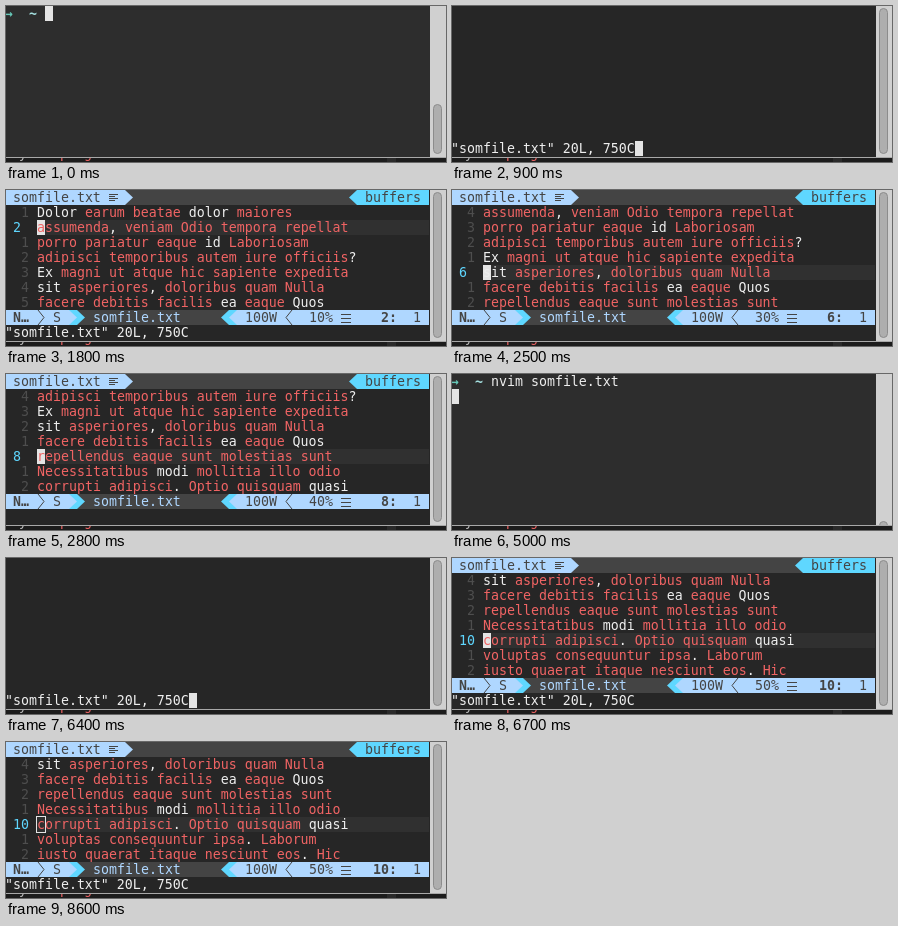
Recreate the animation shown at these times as an HTML page. Size 440 by 156 pixels, loop 8900 ms.

```html
<!DOCTYPE html>
<html lang="en">
<head>
<meta charset="utf-8">
<title>Terminal session</title>
<style>
  html, body { margin: 0; width: 100%; height: 100%; overflow: hidden; background: #1c1c1c; }
  #stage { position: relative; width: 440px; height: 156px; overflow: hidden; background: #1c1c1c;
    font: 13.288px/15px "DejaVu Sans Mono", monospace; color: #eeeeee; }
  #stage div, #stage span.at { position: absolute; white-space: pre; }
  #term { left: 0; top: 0; width: 424px; height: 151px; overflow: hidden; background: #2d2d2d; }
  #term.vim { background: #262626; }
  #bar { left: 424px; top: 0; width: 16px; height: 151px; overflow: hidden; background: #d0d0d0; }
  #thumb { left: 3px; width: 7px; border: 1px solid #8c8c8c; border-radius: 5px; background: #aeaeae; }
  #edge { left: 0; top: 151px; width: 440px; height: 1px; background: #a8a8a8; }
  #below { left: 0; top: 152px; width: 440px; height: 4px; overflow: hidden; color: #b8b8b8; }
  .arrow { color: #66c8b8; font-weight: bold; }
  .home { color: #a4e0e0; font-weight: bold; }
  .bad { color: #f06464; }
  .rel { color: #4e4e4e; }
  .num { color: #5fd7ff; }
  .name { color: #afd7ff; }
  .dark { color: #444444; }
  .bold { color: #444444; font-weight: bold; }
  .right { clip-path: polygon(0 0, 100% 50%, 0 100%); }
  .left { clip-path: polygon(100% 0, 0 50%, 100% 100%); }
  .block { background: #e4e4e4; }
  .hollow { margin: -1px; border: 1px solid #e4e4e4; }
</style>
</head>
<body>
<div id="stage">
  <div id="term"></div>
  <div id="bar"><div id="thumb"></div></div>
  <div id="edge"></div>
  <div id="below">
    <span class="at" style="left:13px;top:-12px">y</span>
    <span class="at bad" style="left:46px;top:-12px"> prog</span>
    <div style="left:381px;top:0;width:9px;height:4px;background:#2a2a2a"></div>
  </div>
</div>
<script>
const LOOP = 8900, CELL = 8, ROW = 15, COLS = 53;
const LIGHT = '#afd7ff', CYAN = '#5fd7ff', GREY = '#444444';
const FILE = 'somfile.txt', INFO = `"${FILE}" 20L, 750C`;
const TEXT = [
  'Dolor earum beatae dolor maiores',
  'assumenda, veniam Odio tempora repellat',
  'porro pariatur eaque id Laboriosam',
  'adipisci temporibus autem iure officiis?',
  'Ex magni ut atque hic sapiente expedita',
  'sit asperiores, doloribus quam Nulla',
  'facere debitis facilis ea eaque Quos',
  'repellendus eaque sunt molestias sunt',
  'Necessitatibus modi mollitia illo odio',
  'corrupti adipisci. Optio quisquam quasi',
  'voluptas consequuntur ipsa. Laborum',
  'iusto quaerat itaque nesciunt eos. Hic'
];
const KNOWN = new Set('Dolor dolor id Ex sit ea Quos modi quasi'.split(' '));
const THUMBS = { start: [98, 50], full: [2, 146], end: [147, 50] };

const term = document.getElementById('term');
const thumb = document.getElementById('thumb');

const x = col => col * CELL - 1;
const put = (col, row, text, cls = '') =>
  `<span class="at ${cls}" style="left:${x(col)}px;top:${row * ROW}px">${text}</span>`;
const box = (col, row, cols, color, cls = '') =>
  `<div class="${cls}" style="left:${x(col)}px;top:${row * ROW}px;width:${cols * CELL}px;` +
  `height:${ROW}px;${color ? 'background:' + color : ''}"></div>`;
const cursor = (col, row, kind = 'block') => box(col, row, 1, '', kind);

// Menu sign made of evenly spaced strokes
const menu = (col, row, gap, widths) => widths.map((w, i) =>
  `<div style="left:${x(col)}px;top:${row * ROW + 4 + i * gap}px;width:${w}px;height:1px;background:${GREY}"></div>`).join('');

// Thin separator between parts of the status line
const chevron = (col, row, points) =>
  `<svg style="position:absolute;left:${x(col)}px;top:${row * ROW}px" width="8" height="15">` +
  `<polyline points="${points}" fill="none" stroke="${GREY}"/></svg>`;

const spell = line => line.replace(/\w+/g, w => KNOWN.has(w) ? w : `<span class="bad">${w}</span>`);

const prompt = (row, cmd = '') =>
  put(0, row, '→', 'arrow') + put(3, row, '~', 'home') + put(5, row, cmd);

function shell(cmds, cur, bar) {
  return { bar, html: cmds.map((c, i) => prompt(i, c)).join('') + cursor(...cur) };
}

function loading(message) {
  return { vim: true, bar: 'full',
    html: message ? put(0, 9, message) + cursor(message.length, 9) : '' };
}

function tabline() {
  return box(0, 0, COLS, GREY) + box(0, 0, 15, LIGHT) + box(15, 0, 1, LIGHT, 'right') +
    put(1, 0, FILE, 'dark') + menu(13, 0, 2, [9, 6, 9, 6]) +
    box(43, 0, 1, CYAN, 'left') + box(44, 0, 9, CYAN) + put(45, 0, 'buffers', 'dark');
}

function statusline(line) {
  const pct = `${line * 5}%`.padStart(4), pos = `${line}:`.padStart(3);
  return box(0, 8, COLS, LIGHT) + box(9, 8, 19, GREY) +
    box(8, 8, 1, CYAN) + box(8, 8, 1, LIGHT, 'right') + box(9, 8, 1, CYAN, 'right') +
    box(27, 8, 1, CYAN, 'left') + box(28, 8, 1, CYAN) + box(28, 8, 1, LIGHT, 'left') +
    put(1, 8, 'N…', 'bold') + chevron(4, 8, '1,0 7,7.5 1,15') + put(6, 8, 'S', 'dark') +
    put(11, 8, FILE, 'name') + put(30, 8, '100W', 'dark') + chevron(35, 8, '7,0 1,7.5 7,15') +
    put(37, 8, pct, 'dark') + menu(42, 8, 4, [10, 10, 10]) +
    put(46, 8, pos, 'bold') + put(51, 8, '1', 'dark');
}

function editor(line, { message = '', kind = 'block', command = false } = {}) {
  const top = Math.max(1, line - 4), row = line - top + 1;
  let html = tabline() + box(4, row, COLS - 4, '#303030');
  if (!command) html += cursor(4, row, kind);
  for (let i = 0; i < 7; i++) {
    const n = top + i, here = n === line;
    html += here ? put(1, i + 1, n, 'num') : put(2, i + 1, Math.abs(n - line), 'rel');
    html += put(4, i + 1, spell(TEXT[n - 1]));
  }
  html += statusline(line) + put(0, 9, message);
  if (command) html += cursor(message.length, 9);
  return { vim: true, bar: 'full', html };
}

const RUN = `nvim ${FILE}`, RUN_END = 5 + RUN.length;
const steps = [
  [0, shell([''], [5, 0], 'start')],
  [400, shell([RUN], [RUN_END, 0], 'start')],
  [600, shell([RUN], [0, 1], 'start')],
  [800, loading('')],
  [900, loading(INFO)],
  // Walk down the file; the message goes away once the window scrolls
  ...[1100, 1800, 2000, 2100, 2300, 2500, 2600, 2800, 3000, 3200].map((t, i) =>
    [t, editor(i + 1, { message: i < 5 ? INFO : '' })]),
  [4100, editor(10, { message: ':', command: true })],
  [4700, editor(10, { message: ':q', command: true })],
  [5000, shell([RUN], [0, 1], 'end')],
  [5100, shell([RUN, ''], [5, 1], 'end')],
  [5700, shell([RUN, RUN], [RUN_END, 1], 'end')],
  [6100, shell([RUN, RUN], [0, 2], 'end')],
  [6400, loading(INFO)],
  [6700, editor(10, { message: INFO })],
  [8600, editor(10, { message: INFO, kind: 'hollow' })]
];

let shown = null;
function show(state) {
  if (state === shown) return;
  shown = state;
  term.className = state.vim ? 'vim' : '';
  term.innerHTML = state.html;
  const [top, height] = THUMBS[state.bar];
  thumb.style.top = top + 'px';
  thumb.style.height = height - 2 + 'px';
}

const began = performance.now();
function tick() {
  const t = (performance.now() - began) % LOOP;
  show(steps.findLast(([at]) => at <= t)[1]);
  requestAnimationFrame(tick);
}
tick();
</script>
</body>
</html>
```
